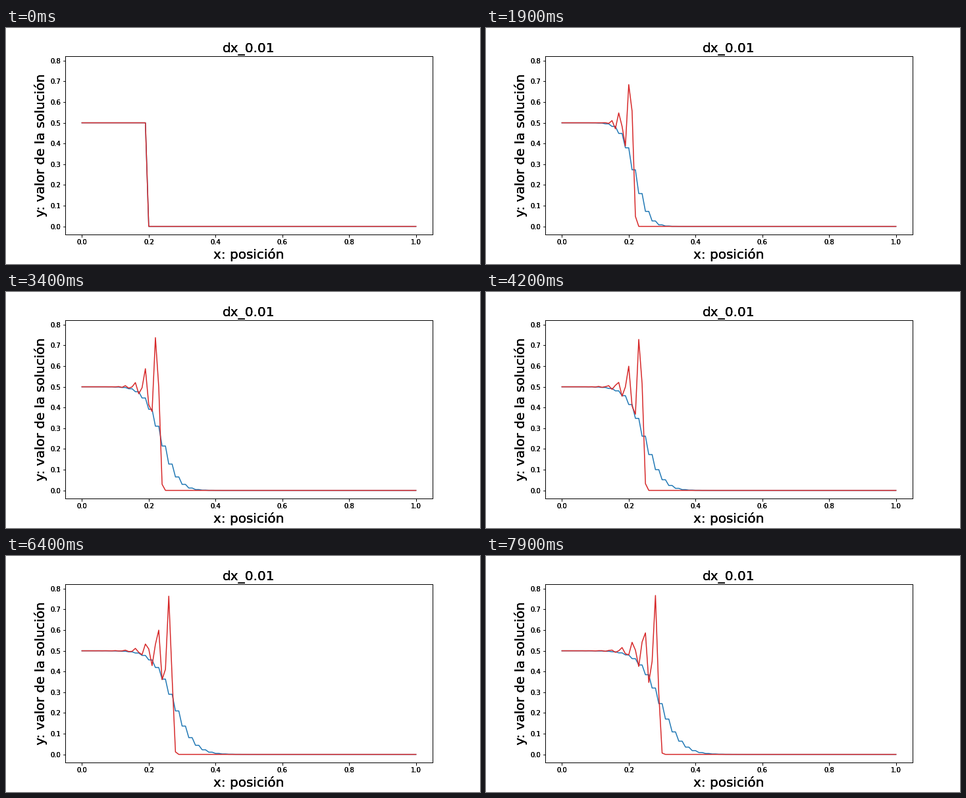
These frames come from a looping animation (720x360 px, 8000 ms). A matplotlib script:

```python
import numpy as np
import matplotlib.pyplot as plt
from matplotlib.animation import FuncAnimation

plt.rcParams.update({
    "font.family": "DejaVu Sans",
    "font.size": 10,
    "figure.subplot.bottom": 0.125,
})

FRAMES, INTERVAL = 80, 100
DX, DT = 0.01, 0.005
RATIO = DT / DX
LAYERS = 3  # stacked copies of the frame give the heavy, crisp lettering

x = np.linspace(0, 1, 101)
start = np.where(np.arange(x.size) < 20, 0.5, 0.0)


def flux(u):
    return u * u / 2


def lax_friedrichs(u):
    new = u.copy()
    f = flux(u)
    new[1:-1] = (u[2:] + u[:-2]) / 2 - RATIO / 2 * (f[2:] - f[:-2])
    return new


def lax_wendroff(u):
    """Two-step Richtmyer form."""
    new = u.copy()
    half = (u[1:] + u[:-1]) / 2 - RATIO / 2 * np.diff(flux(u))
    new[1:-1] -= RATIO * np.diff(flux(half))
    return new


def solve(step):
    states = [start]
    for _ in range(FRAMES - 1):
        states.append(step(states[-1]))
    return np.array(states)


def limits(low, high):
    pad = 0.05 * (high - low)
    return low - pad, high + pad


smooth = solve(lax_friedrichs)
sharp = solve(lax_wendroff)

fig = plt.figure(figsize=(10, 5), dpi=72, facecolor="white")


def add_frame(face):
    ax = fig.add_axes([0.125, 0.125, 0.775, 0.755], facecolor=face)
    ax.set_xlim(*limits(0, 1))
    ax.set_ylim(*limits(0, sharp.max()))
    ax.set_title("dx_0.01", fontsize=20)
    ax.set_xlabel("x: posición", fontsize=20)
    ax.set_ylabel("y: valor de la solución", fontsize=20)
    return ax


axes = [add_frame("white" if i == 0 else "none") for i in range(LAYERS)]
blue, = axes[0].plot(x, start, color="tab:blue", lw=1.5)
red, = axes[0].plot(x, start, color="tab:red", lw=1.5)


def update(n):
    blue.set_ydata(smooth[n])
    red.set_ydata(sharp[n])
    return blue, red


anim = FuncAnimation(fig, update, frames=FRAMES, interval=INTERVAL,
                     repeat=True, repeat_delay=0)
plt.show()
```
